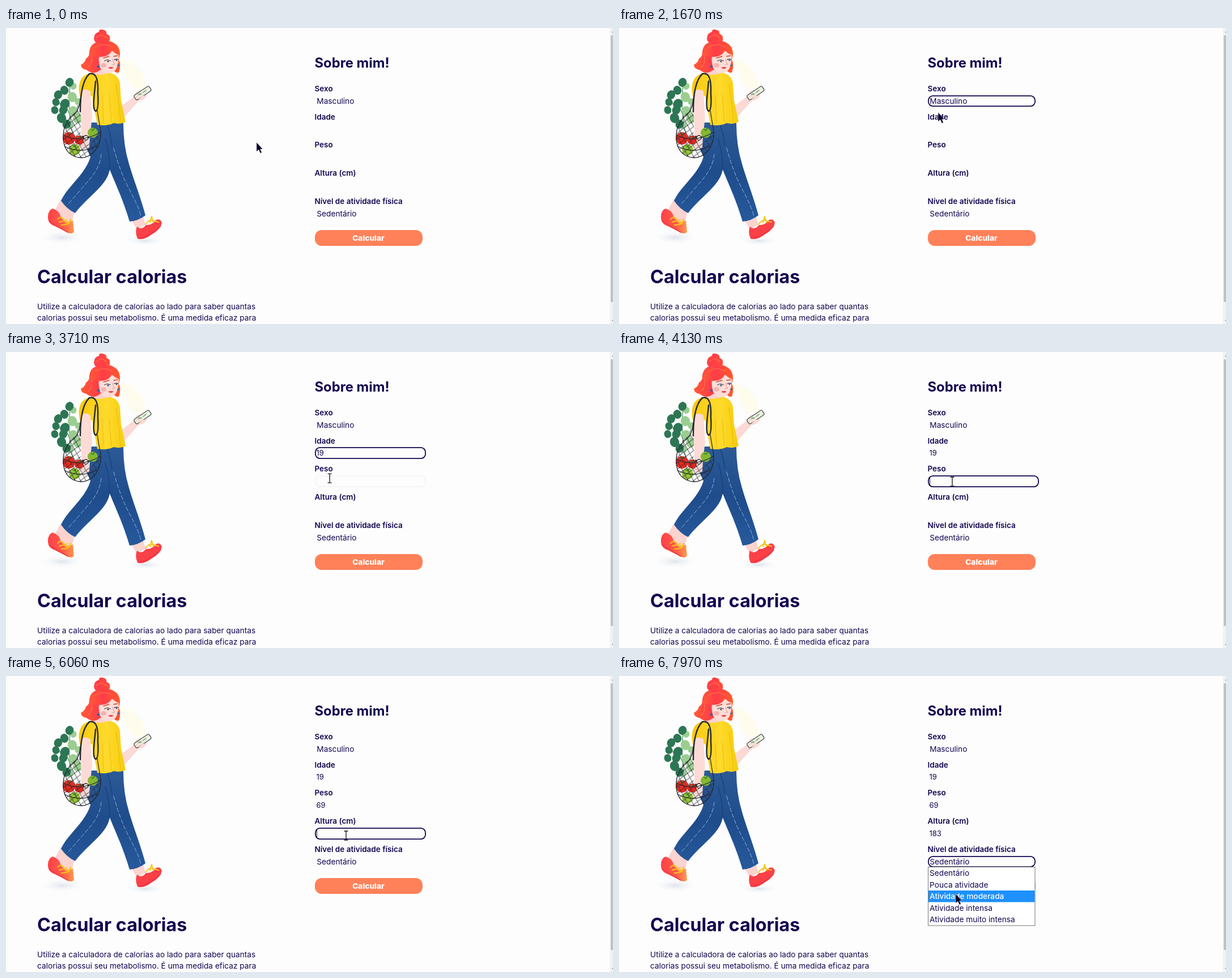
An HTML page for the animation above (8 s loop, 1071x523 px).

```html
<!DOCTYPE html>
<html lang="pt">
<head>
<meta charset="utf-8">
<title>Calcular calorias</title>
<style>
html, body { margin: 0; width: 100%; height: 100%; overflow: hidden; background: #fdfdfd; }
svg { display: block; width: 100%; height: 100%; }
text { font: 13.7px Inter, "Open Sans", sans-serif; fill: #14054f; white-space: pre; }
.label { font-size: 13.5px; font-weight: 600; }
.value { font-size: 13px; }
.bold { font-weight: 700; }
.chosen { fill: #fff; font-weight: 500; }
.line { fill: none; stroke-linecap: round; stroke-linejoin: round; }
</style>
</head>
<body>
<svg id="stage" viewBox="0 0 1071 523" preserveAspectRatio="none">
  <defs>
    <linearGradient id="hair"><stop stop-color="#ff5a35"/><stop offset=".45" stop-color="#ff3d48"/><stop offset="1" stop-color="#ff5a2b"/></linearGradient>
    <linearGradient id="shirt"><stop stop-color="#f8c90f"/><stop offset=".6" stop-color="#ffda2b"/><stop offset="1" stop-color="#f6cc0e"/></linearGradient>
    <linearGradient id="jeans" x2="0" y2="1"><stop stop-color="#2c5a97"/><stop offset=".5" stop-color="#1f4c8b"/><stop offset="1" stop-color="#26599c"/></linearGradient>
    <linearGradient id="shoe"><stop stop-color="#ff4148"/><stop offset=".6" stop-color="#ff5b4a"/><stop offset="1" stop-color="#ff9a4d"/></linearGradient>
    <radialGradient id="shadow"><stop stop-color="#dfe5ec"/><stop offset="1" stop-color="#fdfdfd" stop-opacity="0"/></radialGradient>
    <pattern id="mesh" width="11" height="13" patternUnits="userSpaceOnUse" patternTransform="rotate(12)">
      <path d="M0 0L11 13M11 0L0 13" stroke="#25282f" stroke-width="1"/>
    </pattern>
  </defs>

  <g id="walker">
    <ellipse cx="99" cy="370" rx="42" ry="13" fill="url(#shadow)"/>
    <ellipse cx="246" cy="376" rx="38" ry="9" fill="url(#shadow)"/>
    <path d="M203 54Q229 62 241 82L248 104 228 110Q210 92 203 54Z" fill="#fefcec"/>

    <!-- legs and shoes -->
    <path d="M96 304L85 324Q98 345 116 344L122 320ZM219 336L231 356 246 347 241 329Z" fill="#fbd3cf"/>
    <path d="M82 319Q74 322 74 334T86 350L106 360Q116 366 120 360L118 340Q106 347 97 335Q94 322 82 319Z" fill="url(#shoe)"/>
    <path d="M231 351Q227 361 232 372Q242 376 257 365Q273 356 275 344Q272 336 265 339Q257 349 247 348Q239 358 231 351Z" fill="#fb4048"/>
    <path d="M76 341Q91 351 109 361M234 372Q255 367 273 350" class="line" stroke="#e93442" stroke-width="1.5"/>
    <path d="M91 338Q98 330 103 340T114 338Q113 349 98 348M94 343L108 339M246 347Q252 338 258 340T269 343M254 344L257 333 260 344" class="line" stroke="#f6c51b" stroke-width="2"/>
    <path d="M145 167L207 167Q207 208 217 240C226 271 238 300 246 331Q233 341 218 342C207 304 194 278 183 250C178 279 145 297 122 327Q107 320 97 305C110 278 139 260 149 228L140 207Z" fill="url(#jeans)"/>
    <path d="M183 250Q183 220 175 196M178 169Q185 190 187 207" class="line" stroke="#184078" stroke-width="1.3"/>
    <path d="M190 212Q201 254 218 286T238 333M168 223Q166 246 148 267T108 313" class="line" stroke="#8fb2dc" stroke-width="1" stroke-dasharray="7 4"/>

    <!-- arm with phone, neck, shirt -->
    <path d="M202 139L226 121Q229 109 239 110L249 119Q244 128 234 129L209 157Z" fill="#fcd9d4"/>
    <rect x="-16" y="-4.8" width="32" height="9.6" rx="2.5" transform="translate(241 115) rotate(-34)" fill="#edf0df" stroke="#49504c" stroke-width="1.3"/>
    <path d="M231 121L239 116M242 114L247 110M233 118L236 116" class="line" stroke="#6e9b6f" stroke-width="1.5"/>
    <path d="M230 123Q235 116 241 122M236 126Q242 120 246 121" class="line" stroke="#fcd9d4" stroke-width="3"/>
    <path d="M154 70L183 76 180 88Q166 95 151 84Z" fill="#fbd1cb"/>
    <path d="M150 80Q165 86 182 79 197 81 201 97L203 128 211 166Q202 171 190 168 178 174 161 171L152 120 131 124Q125 101 134 88 140 81 150 80Z" fill="url(#shirt)"/>
    <path d="M194 99Q200 133 202 166M182 118L186 166M170 118L172 168" class="line" stroke="#e4b70b" stroke-width=".8"/>

    <!-- greens, groceries, net and left arm -->
    <path d="M119 193Q108 148 113 101M111 178L93 128M114 157L102 128M119 161L127 137" class="line" stroke="#5c9d6d" stroke-width="1.5"/>
    <g id="leaves"></g>
    <path d="M132 112Q141 105 149 112L152 158 148 193 147 211Q140 216 130 208L133 189 132 155Z" fill="#fcdbd6"/>
    <path d="M132 206Q138 211 147 207M134 211Q139 215 146 211" class="line" stroke="#eeaaa5" stroke-width=".8"/>
    <g id="fruit"></g>
    <path d="M134 192L147 193" stroke="#25282f" stroke-width="3"/>
    <circle cx="141" cy="194" r="4" fill="#f6f4e7" stroke="#25282f" stroke-width="1.5"/>
    <path d="M131 145Q106 151 101 187 99 217 119 227 139 235 155 219 169 204 167 181L148 205 132 190Z" fill="url(#mesh)"/>
    <path d="M131 125Q130 145 118 155 101 168 101 192 101 217 119 226 139 235 155 219 169 204 167 181 164 165 161 146M101 189Q131 205 167 184M103 209Q131 223 160 209" class="line" stroke="#25282f" stroke-width="1.3"/>
    <path d="M131 148Q131 96 147 81C160 77 163 94 162 115Q164 146 158 147C151 143 157 111 158 94" class="line" stroke="#25282f" stroke-width="2.4"/>

    <!-- head -->
    <path d="M155 19Q156 8 164 7 164 1 171 3 179 5 177 10 185 13 183 22 180 30 168 29 156 28 155 19ZM147 43Q148 26 166 24 184 19 196 31 204 42 199 56 204 65 199 79 191 79 189 73L166 74Q155 84 142 74 133 73 132 65 140 61 141 54 147 51 147 43Z" fill="url(#hair)"/>
    <path d="M164 47Q162 66 170 77 180 83 190 77 199 71 199 45L182 39Z" fill="#fcddd7"/>
    <path d="M147 48Q163 53 175 50 184 47 187 39 193 47 201 48 201 31 190 27 167 19 153 31Z" fill="url(#hair)"/>
    <ellipse cx="172" cy="66" rx="5" ry="4" fill="#f8b4af"/>
    <path d="M172 53L182 50M190 50L197 49" class="line" stroke="#c84332" stroke-width="1.4"/>
    <path d="M174 58Q179 55 184 58M191 56Q195 54 198 56" class="line" stroke="#292632" stroke-width="1.2"/>
    <circle cx="180" cy="59" r="1.6" fill="#29547d"/><circle cx="195" cy="57" r="1.4" fill="#29547d"/>
    <path d="M188 55Q189 62 192 64L187 65" class="line" stroke="#eba39c" stroke-width="1.2"/>
    <path d="M180 70Q186 68 190 70 185 74 180 70Z" fill="#e93742"/>
    <circle cx="163" cy="68" r="2.2" fill="#346a9e"/><circle cx="198" cy="66" r="1.8" fill="#346a9e"/>
    <path d="M160 17Q169 8 177 17M151 49Q153 63 145 69M158 34Q173 25 187 34" class="line" stroke="#ff7650" stroke-width="1.2"/>
  </g>

  <text x="55" y="451" class="bold" style="font-size:32.3px">Calcular calorias</text>
  <text x="55" y="497">Utilize a calculadora de calorias ao lado para saber quantas</text>
  <text x="55" y="517">calorias possui seu metabolismo. É uma medida eficaz para</text>
  <text x="544.5" y="70" class="bold" style="font-size:23.8px">Sobre mim!</text>
  <g id="form"></g>
  <rect x="545" y="357" width="190" height="28" rx="12" fill="#ff8159"/>
  <text x="639.5" y="375.5" text-anchor="middle" style="fill:#fff;font-weight:800">Calcular</text>

  <path id="caret" stroke="#111" stroke-width="1"/>
  <g id="menu"></g>

  <rect x="1065.5" width="6" height="523" fill="#f1f1f1"/>
  <rect x="1067" y="13" width="4" height="471" fill="#c1c1c1"/>
  <path d="M1069 8L1071 6V8ZM1069 516H1071V518Z" fill="#777"/>

  <path id="arrow" d="M0 -1V15.5L3.8 12 6.7 18.3 9.4 17 6.6 11H11Z" fill="#0b0524" stroke="#fff" stroke-width=".5"/>
  <path id="beam" class="line" d="M-3 -8H-1Q0 -8 0 -7V7Q0 8 -1 8H-3M3 -8H1Q0 -8 0 -7M3 8H1Q0 8 0 7" stroke="#111" stroke-width="1.3"/>
</svg>
<script>
const LOOP = 8000;
const $ = id => document.getElementById(id);

function add(parent, tag, attrs, content = '') {
  const node = document.createElementNS('http://www.w3.org/2000/svg', tag);
  for (const key in attrs) node.setAttribute(key, attrs[key]);
  node.textContent = content;
  parent.append(node);
  return node;
}

const show = (node, visible) => node.setAttribute('visibility', visible ? 'visible' : 'hidden');

// Leaves: x, y, radius; the first group is lighter and lies behind.
const leafGroups = [
  ['#9bcd91', [[119, 103, 6], [117, 122, 9], [127, 130, 6], [119, 147, 9], [127, 160, 9], [113, 171, 7]]],
  ['#2d7654', [[112, 96, 8], [103, 110, 8], [92, 118, 8], [88, 131, 7], [104, 134, 9], [86, 145, 7], [101, 145, 8], [98, 159, 9], [107, 170, 8]]]
];
for (const [fill, leaves] of leafGroups)
  leaves.forEach(([cx, cy, r], i) => add($('leaves'), 'ellipse', {
    cx, cy, rx: r * .9, ry: r, fill, transform: `rotate(${i % 2 ? -20 : 25} ${cx} ${cy})`
  }));
for (const [cx, cy, r, fill] of [[111, 195, 11, '#e52b20'], [129, 198, 8, '#df281f'], [153, 185, 9, '#83b82f'], [121, 215, 10, '#94c534']]) {
  add($('fruit'), 'circle', { cx, cy, r, fill });
  add($('fruit'), 'path', { d: `M${cx - 3} ${cy - r + 3}l3 2 3 -4`, class: 'line', stroke: '#38763c', 'stroke-width': 1.5 });
}

// Each field is focused until the next one; typed entries are [time, text].
const fields = [
  { label: 'Sexo', y: 119, select: true, focus: 1140, typed: [[0, 'Masculino']] },
  { label: 'Idade', y: 168, focus: 1950, typed: [[2970, '1'], [3040, '19']] },
  { label: 'Peso', y: 218, focus: 3830, typed: [[4990, '6'], [5120, '69']] },
  { label: 'Altura (cm)', y: 268, focus: 5780, typed: [[6280, '1'], [6680, '18'], [6950, '183']] },
  { label: 'Nível de atividade física', y: 318, select: true, focus: 7560, typed: [[0, 'Sedentário']] }
];
fields.forEach((field, i) => {
  field.width = field.select ? 190 : 196;
  field.height = field.select ? 20 : 21;
  field.end = fields[i + 1]?.focus ?? LOOP;
  add($('form'), 'text', { x: 544.5, y: 112 + i * 49.7, class: 'label' }, field.label);
  field.box = add($('form'), 'rect', {
    x: 545.9, y: field.y + .9, width: field.width - 1.8, height: field.height - 1.8, rx: 8, fill: 'none'
  });
  field.text = add($('form'), 'text', {
    x: field.select ? 548.3 : 547.5, y: field.y + 14.6, class: field.select ? '' : 'value'
  });
});

const menuTime = 7620, rowHeight = 20.5, menuTop = 338;
add($('menu'), 'rect', { x: 545.5, y: 337.5, width: 188.5, height: 103.5, fill: '#fff', stroke: '#777' });
const highlight = add($('menu'), 'rect', { x: 546, width: 187.5, height: rowHeight, fill: '#1e90ff' });
const options = ['Sedentário', 'Pouca atividade', 'Atividade moderada', 'Atividade intensa', 'Atividade muito intensa']
  .map((name, i) => add($('menu'), 'text', { x: 548, y: 353 + i * rowHeight }, name));

// Pointer path: time, x, y.
const route = [
  [290, 442, 203], [460, 465, 188], [800, 540, 138], [1070, 562, 127], [1140, 562, 128],
  [1340, 563, 149], [1560, 563, 149], [1670, 563, 150], [1880, 564, 172], [2090, 564, 176],
  [3410, 564, 176], [3520, 566, 190], [3710, 571, 223], [3870, 584, 229], [4130, 588, 229],
  [5490, 588, 229], [5660, 592, 255], [5850, 598, 278], [6060, 600, 282],
  [7240, 600, 282], [7420, 610, 325], [7560, 608, 328], [7750, 600, 355], [7970, 594, 386]
];
const caretOn = [[2120, 2620], [2970, 3440], [3830, 4330], [4730, 5520], [5780, 7280]];

function pointerAt(t) {
  const next = route.findIndex(point => point[0] > t);
  if (next === 0) return route[0].slice(1);
  if (next < 0) return route.at(-1).slice(1);
  const [t0, x0, y0] = route[next - 1], [t1, x1, y1] = route[next];
  const k = (t - t0) / (t1 - t0);
  return [x0 + (x1 - x0) * k, y0 + (y1 - y0) * k];
}

function draw(t) {
  const [x, y] = pointerAt(t);
  const menuOpen = t >= menuTime;
  let overInput = false, focused;

  for (const field of fields) {
    const hover = x > 545 && x < 545 + field.width && y >= field.y && y <= field.y + field.height;
    const active = t >= field.focus && t < field.end;
    if (hover && !field.select) overInput = true;
    if (active) focused = field;
    field.text.textContent = field.typed.findLast(entry => t >= entry[0])?.[1] ?? '';
    field.box.setAttribute('stroke', active ? '#14054f' : '#eee');
    field.box.setAttribute('stroke-width', active ? 1.8 : 1);
    show(field.box, active || hover && !menuOpen);
  }

  const caret = focused && caretOn.some(([from, to]) => t >= from && t < to);
  show($('caret'), caret);
  if (caret) {
    const caretX = 548.5 + focused.text.getComputedTextLength();
    $('caret').setAttribute('d', `M${caretX} ${focused.y + 3}v16`);
  }

  show($('menu'), menuOpen);
  const row = Math.max(0, Math.floor((y - menuTop) / rowHeight));
  highlight.setAttribute('y', menuTop + row * rowHeight);
  options.forEach((option, i) => option.setAttribute('class', i === row ? 'chosen' : ''));

  for (const id of ['arrow', 'beam']) {
    $(id).setAttribute('transform', `translate(${x} ${y})`);
    show($(id), overInput === (id === 'beam'));
  }
}

function tick() {
  draw(performance.now() % LOOP);
  requestAnimationFrame(tick);
}
tick();
</script>
</body>
</html>
```
